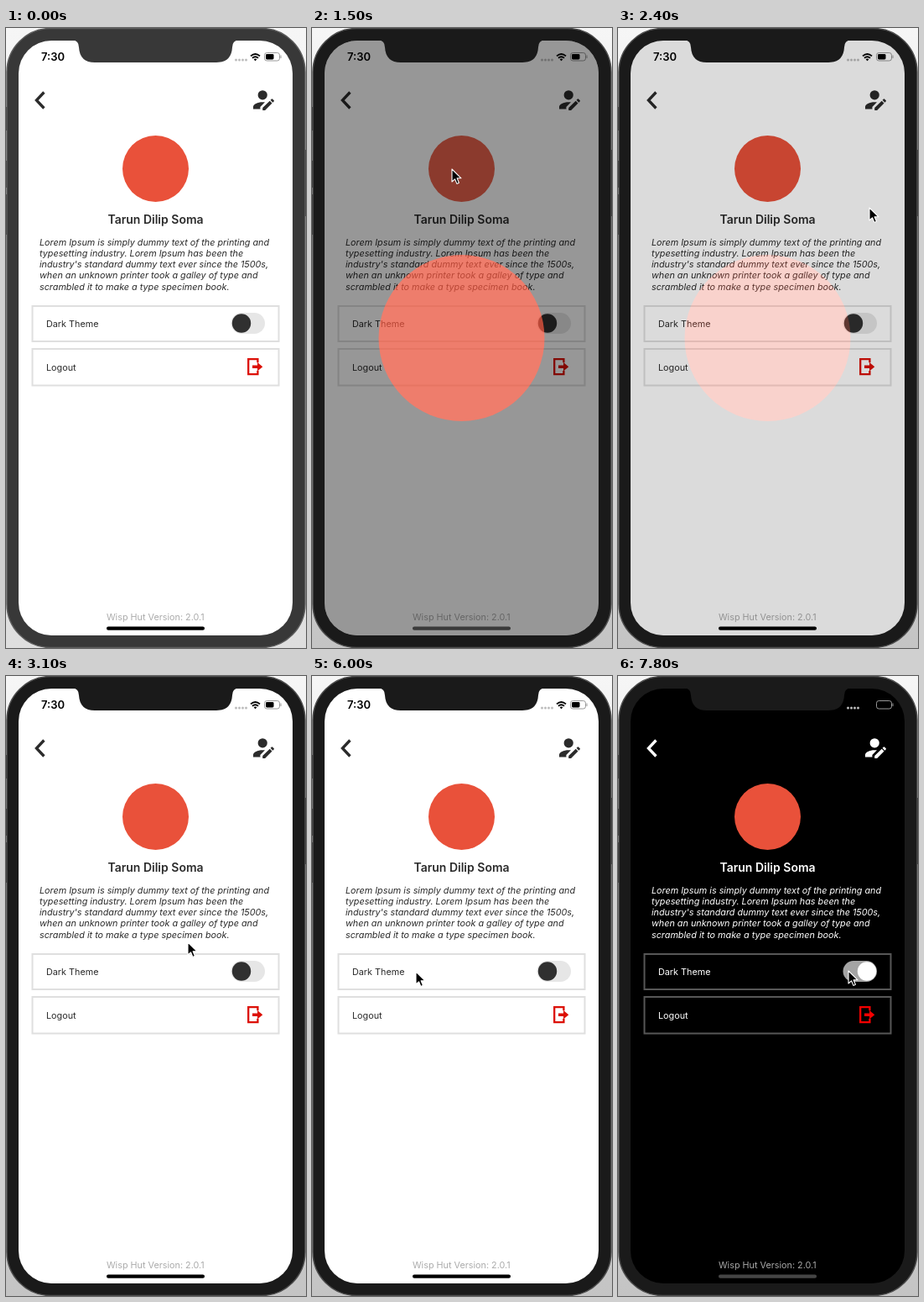
An HTML page for the animation above (8 s loop, 358 px wide and 738 px high).

```html
<!DOCTYPE html>
<html lang="en">
<head>
<meta charset="utf-8">
<title>Profile screen</title>
<style>
  html, body { margin: 0; width: 100%; height: 100%; overflow: hidden; background: #fff; }
  svg {
    display: block; width: 358px; height: 738px;
    font: 10.8px Inter, "Liberation Sans", sans-serif;
    --case: #1a1a1a; --rim: #4c4c4c; --shade: #c4c4c4;
    --screen: #fff; --ink: #2b2b2b; --line: #dfdfdf; --faint: #ababab;
    --red: #dc1006; --track: #e6e6e6; --knob: #303030; --home: #000;
  }
  .inactive { --case: #383838; --rim: #5c5c5c; --shade: #dedede; }
  .dark {
    --screen: #000; --ink: #fff; --line: #575757; --faint: #a8a8a8;
    --red: #f40000; --track: #a4a4a4; --knob: #fff; --home: #454545;
  }
  .dimmed { --home: #3a3a3a; }
  .ink { fill: var(--ink); }
  .case { fill: var(--case); }
  .box { fill: none; stroke: var(--line); stroke-width: 2; }
</style>
</head>
<body>
<svg id="stage" viewBox="0 0 358 738">
  <defs>
    <linearGradient id="floor" x2="0" y2="1">
      <stop stop-color="#f6f6f6"/>
      <stop offset="1" style="stop-color:var(--shade)"/>
    </linearGradient>
    <clipPath id="glass"><rect x="15" y="15" width="327" height="708" rx="39"/></clipPath>
  </defs>

  <rect width="358" height="738" fill="url(#floor)"/>
  <path d="M.5 94V122M.5 158V190M.5 198V246M357.5 145V224" stroke="#222"/>
  <rect class="case" x="1" y=".5" width="356" height="737" rx="52" style="stroke:var(--rim)" stroke-width="1.5"/>

  <g clip-path="url(#glass)">
    <rect x="15" y="15" width="327" height="708" style="fill:var(--screen)"/>

    <!-- Status bar -->
    <text x="42" y="39" font-size="13" font-weight="600">7:30</text>
    <g fill="#bdbdbd">
      <circle cx="274.5" cy="38" r="1.5"/><circle cx="278.5" cy="38" r="1.5"/>
      <circle cx="282.5" cy="38" r="1.5"/><circle cx="286.5" cy="38" r="1.5"/>
    </g>
    <g fill="none" stroke="#000" stroke-width="1.9">
      <path d="M292 33.4Q297.5 28.6 303 33.4M294 35.8Q297.5 32.7 301 35.8"/>
      <path d="M295.6 37.2Q297.5 35.8 299.4 37.2L297.5 39.2Z" fill="#000" stroke="none"/>
    </g>
    <rect x="308.5" y="29.5" width="18" height="9.5" rx="2.8" fill="none" stroke="#999"/>
    <rect x="310" y="31" width="9.5" height="6.5" rx="1.4"/>
    <path d="M328 32.5v3.5" stroke="#999"/>

    <!-- Header -->
    <path d="M45.4 76.5L36.4 86L45.4 95.5" fill="none" style="stroke:var(--ink)" stroke-width="3.3"/>
    <g class="ink" transform="translate(289.4 68.6) scale(1.4)">
      <circle cx="12" cy="8" r="4"/>
      <path d="M12 14C7.6 14 4 15.8 4 18V20H10V18.1L14 14.1Q13 14 12 14Z"/>
      <path d="M12 18.9L18.1 12.9L20.1 14.9L14.1 21H12ZM18.7 12.3L19.7 11.3Q20 11 20.4 11.3L21.7 12.6Q22 13 21.7 13.4L20.7 14.4Z"/>
    </g>

    <!-- Profile -->
    <circle id="avatar" cx="178.5" cy="167.5" r="39.5" fill="#e9513a"/>
    <g class="ink">
      <text x="178.5" y="233" text-anchor="middle" font-size="14" font-weight="600">Tarun Dilip Soma</text>
      <g font-style="italic">
        <text x="40" y="258.5">Lorem Ipsum is simply dummy text of the printing and</text>
        <text x="40" y="271.8">typesetting industry. Lorem Ipsum has been the</text>
        <text x="40" y="285">industry's standard dummy text ever since the 1500s,</text>
        <text x="40" y="298.3">when an unknown printer took a galley of type and</text>
        <text x="40" y="311.5">scrambled it to make a type specimen book.</text>
      </g>
      <text x="48" y="356">Dark Theme</text>
      <text x="48" y="408">Logout</text>
    </g>
    <rect class="box" x="31.5" y="331" width="294" height="42"/>
    <rect class="box" x="31.5" y="382" width="294" height="43.5"/>

    <rect x="268.5" y="339" width="40.5" height="25" rx="12.5" style="fill:var(--track)"/>
    <circle id="knob" cy="351.5" r="11.2" style="fill:var(--knob)"/>

    <path d="M300.4 398.3V394.2H289.2V412.2H300.4V408" fill="none" style="stroke:var(--red)" stroke-width="2.3"/>
    <path d="M294 401.4H300V398L306.3 403.2L300 408.4V405H294Z" style="fill:var(--red)"/>

    <text x="178.3" y="705" text-anchor="middle" style="fill:var(--faint)">Wisp Hut Version: 2.0.1</text>

    <!-- Enlarged picture -->
    <g id="modal">
      <rect x="15" y="15" width="327" height="708" opacity=".55"/>
      <circle cx="178.5" cy="369" r="99" fill="#e9513a"/>
    </g>
    <rect x="120" y="712.5" width="117" height="4.3" rx="2.1" style="fill:var(--home)"/>
  </g>
  <path class="case" d="M79 14Q87 15 87 23Q88 41 106 41H251Q269 41 270 23Q270 15 278 14Z"/>

  <path id="cursor" d="M0 0V15L3.5 11.8L5.9 17.4L8.4 16.3L6.1 10.8H11Z" stroke="#fff" stroke-width="1.1" stroke-linejoin="round"/>
</svg>

<script>
const LOOP = 8000, ACTIVE = 300, DARK = 6650;
// Cursor stops: time, x, y
const stops = [
  [300, 330, 420], [1000, 167, 168], [1700, 167, 168], [2100, 300, 214],
  [3000, 300, 214], [3100, 217, 317], [3300, 305, 181], [3500, 308, 78],
  [4100, 308, 78], [4200, 181, 164], [4400, 181, 164], [4700, 226, 290],
  [4850, 226, 290], [5200, 308, 78], [5500, 308, 78], [6000, 124, 352],
  [6150, 124, 352], [6500, 275, 351], [LOOP, 275, 351]
];
const [stage, avatar, knob, modal, cursor] =
  ["stage", "avatar", "knob", "modal", "cursor"].map(id => document.getElementById(id));

// Eased progress from 0 to 1 between two times
function ease(t, from, to) {
  const u = Math.min(1, Math.max(0, (t - from) / (to - from)));
  return u * u * (3 - 2 * u);
}

function cursorAt(t) {
  const i = Math.max(1, stops.findIndex(s => s[0] > t));
  const [t0, x0, y0] = stops[i - 1], [t1, x1, y1] = stops[i];
  const k = ease(t, t0, t1);
  return [x0 + (x1 - x0) * k, y0 + (y1 - y0) * k];
}

function draw(t) {
  const shown = ease(t, 1300, 1600) - ease(t, 2200, 2500);
  const pressed = ease(t, 1150, 1280) - ease(t, 1330, 1550);
  stage.classList.toggle("inactive", t < ACTIVE);
  stage.classList.toggle("dark", t >= DARK);
  stage.classList.toggle("dimmed", shown > 0.5);
  modal.setAttribute("opacity", shown);
  avatar.setAttribute("opacity", 1 - 0.77 * pressed);
  knob.setAttribute("cx", 281 + 16 * ease(t, DARK, DARK + 250));
  cursor.setAttribute("visibility", t < ACTIVE ? "hidden" : "visible");
  cursor.setAttribute("transform", `translate(${cursorAt(t)})`);
}

const start = performance.now();
function tick() {
  draw((performance.now() - start) % LOOP);
  requestAnimationFrame(tick);
}
tick();
</script>
</body>
</html>
```
